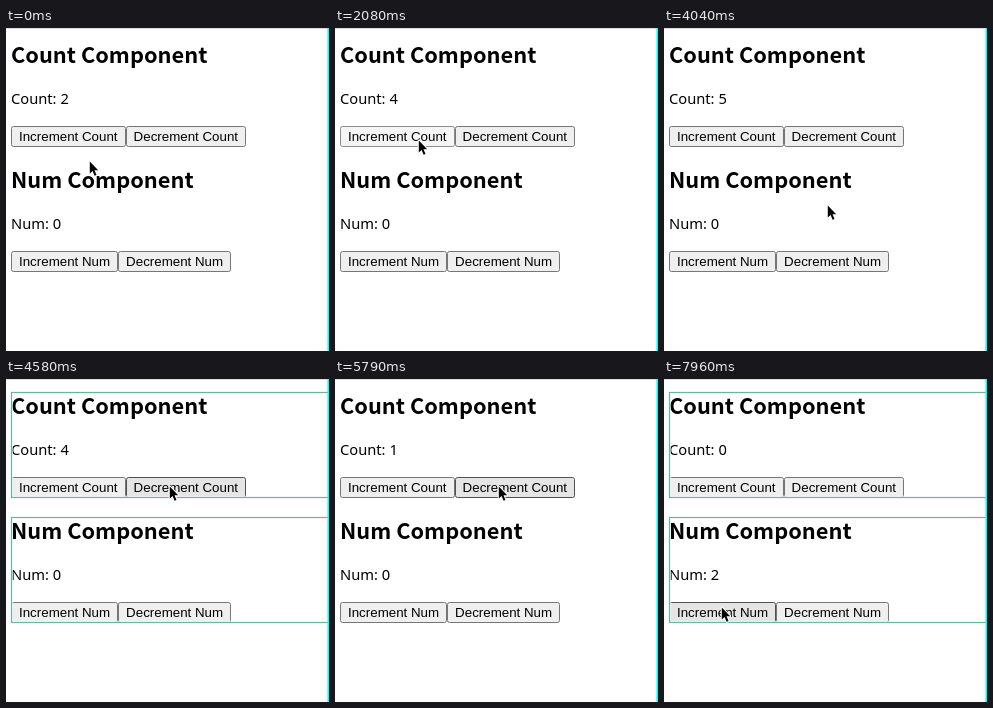
These frames come from a looping animation (323 px wide and 323 px high, 8 s). An HTML page:

```html
<!DOCTYPE html>
<html lang="en">
<head>
<meta charset="utf-8">
<style>
  html, body { margin: 0; width: 100%; height: 100%; overflow: hidden; background: #fff; }
  svg { display: block; width: 100vw; height: 100vh; }
  text { fill: #000; }
  .title { font: 700 21.8px "Noto Sans CJK KR", "Noto Sans CJK JP", "Noto Sans", sans-serif; }
  .value { font: 400 14.7px "Noto Sans", "Open Sans", sans-serif; }
  .label { font: 13.333px "Liberation Sans", Arial, sans-serif; }
</style>
</head>
<body>
<svg id="stage" viewBox="0 0 323 323" xmlns="http://www.w3.org/2000/svg">
  <rect width="323" height="323" fill="#fff"/>
  <rect width="323" height="1" fill="#dcdcdc"/>
  <g id="page"></g>
  <g id="outlines" fill="none"></g>
  <rect x="321" width="1" height="323" fill="#0ff" opacity=".55"/>
  <rect x="322" width="1" height="323" fill="#0ff"/>
  <path id="cursor" d="M.8 1.5V13.6L3.6 11L5.6 15.8L7.5 15L5.5 10.2H9.2Z"
        fill="#000" stroke="#fff" stroke-width="2" stroke-linejoin="round" paint-order="stroke"/>
</svg>
<script>
const DURATION = 8000;
const page = document.getElementById('page');
const outlines = document.getElementById('outlines');
const cursor = document.getElementById('cursor');

// Pointer path: [time, x, y]
const path = [
  [0, 83, 132], [60, 83, 131], [250, 83, 118], [420, 83, 111],
  [3500, 83, 111], [3680, 98, 140], [3860, 140, 184], [3960, 160, 194],
  [4080, 164, 168], [4220, 164, 118], [4330, 163, 106],
  [6500, 163, 106], [6660, 128, 142], [6830, 77, 184], [6880, 72, 196],
  [7030, 60, 220], [7130, 57, 227], [DURATION, 57, 227]
];

// Each click: press time, update time, end of outline, then the changed value
const clicks = [
  [500, 590, 960, 'Count', 3],
  [1330, 1380, 1710, 'Count', 4],
  [2080, 2250, 2540, 'Count', 5],
  [4380, 4450, 4750, 'Count', 4],
  [4710, 4790, 4960, 'Count', 3],
  [5000, 5080, 5290, 'Count', 2],
  [5340, 5420, 5790, 'Count', 1],
  [6210, 6290, 6540, 'Count', 0],
  [7170, 7250, 7500, 'Num', 1],
  [7710, 7790, DURATION, 'Num', 2]
];

function add(parent, tag, attrs, content = '') {
  const node = document.createElementNS('http://www.w3.org/2000/svg', tag);
  for (const key in attrs) node.setAttribute(key, attrs[key]);
  node.textContent = content;
  parent.appendChild(node);
  return node;
}

const buttons = [];
const values = {};

function addButton(left, right, y, label) {
  const x = Math.round(left);
  const width = right - x;
  const box = add(page, 'rect', { x: x + .5, y: y + .5, width: width - 1, height: 20, rx: 2 });
  add(page, 'text', { x: left + 8, y: y + 15, class: 'label' }, label);
  buttons.push({ box, x, y, width });
}

function addComponent(name, top, split, right) {
  add(page, 'text', { x: 5, y: top + 35, class: 'title' }, `${name} Component`);
  values[name] = add(page, 'text', { x: 5, y: top + 76, class: 'value' });
  addButton(5, Math.round(split), top + 98, `Increment ${name}`);
  addButton(split, right, top + 98, `Decrement ${name}`);
  const frame = { x: 5.5, y: top + 13.5, width: 330, height: 105 };
  add(outlines, 'rect', { ...frame, stroke: '#f0f0f0', 'stroke-width': 3, 'stroke-opacity': .7 });
  add(outlines, 'rect', { ...frame, stroke: '#63b7a4' });
}

addComponent('Count', 0, 119.6, 240);
addComponent('Num', 125, 112.1, 225);

function pointerAt(time) {
  const next = Math.max(1, path.findIndex(point => point[0] > time));
  const [t0, x0, y0] = path[next - 1];
  const [t1, x1, y1] = path[next];
  const k = (time - t0) / (t1 - t0);
  return [x0 + (x1 - x0) * k, y0 + (y1 - y0) * k];
}

function render(time) {
  const [px, py] = pointerAt(time);
  cursor.setAttribute('transform', `translate(${Math.round(px)} ${Math.round(py)})`);

  const state = { Count: 2, Num: 0 };
  let pressed = false, lit = false;
  for (const [down, update, end, name, value] of clicks) {
    if (time >= update) state[name] = value;
    if (time >= down && time < update) pressed = true;
    if (time >= update && time < end) lit = true;
  }
  for (const name in state) values[name].textContent = `${name}: ${state[name]}`;
  outlines.setAttribute('visibility', lit ? 'visible' : 'hidden');

  for (const { box, x, y, width } of buttons) {
    const hover = px >= x && px < x + width && py >= y && py < y + 21;
    const [fill, stroke] = !hover ? ['#efefef', '#767676']
      : pressed ? ['#f5f5f5', '#8d8d8d'] : ['#e5e5e5', '#4f4f4f'];
    box.setAttribute('fill', fill);
    box.setAttribute('stroke', stroke);
  }
}

const start = performance.now();
function tick() {
  render((performance.now() - start) % DURATION);
  requestAnimationFrame(tick);
}
tick();
</script>
</body>
</html>
```
